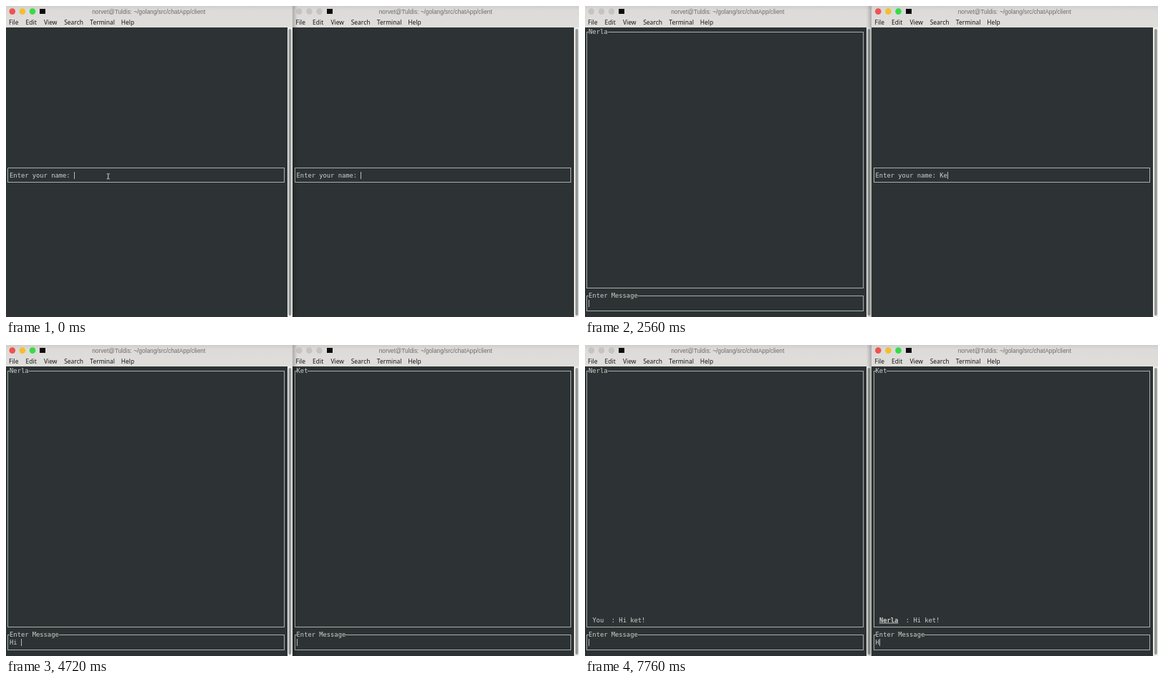
Recreate the animation shown at these times as an HTML page. Size 800 by 435 pixels, loop 8000 ms.

```html
<!DOCTYPE html>
<html lang="en">
<head>
<meta charset="utf-8">
<title>Terminal chat</title>
<style>
html, body { margin: 0; width: 100%; height: 100%; overflow: hidden; background: #2d3334; }
svg { display: block; width: 100vw; height: 100vh; }
text { white-space: pre; }
.mono { font: 8.77px "DejaVu Sans Mono", monospace; fill: #cdd1cb; }
.menu { font: 8.45px "Noto Sans", sans-serif; fill: #161616; }
.title { font: 8.32px "Liberation Sans", sans-serif; fill: #6d6c6a; text-anchor: middle; }
.line { fill: none; stroke: #a9b0ae; stroke-width: 1; }
.line, .crisp { shape-rendering: crispEdges; }
.sender { font-weight: bold; text-decoration: underline; }
</style>
</head>
<body>
<svg id="stage" viewBox="0 0 800 435" preserveAspectRatio="none">
  <defs>
    <linearGradient id="bar" x2="0" y2="1">
      <stop offset="0" stop-color="#cfcecd"/>
      <stop offset=".2" stop-color="#dcdbd9"/>
      <stop offset="1" stop-color="#dfdedb"/>
    </linearGradient>
    <linearGradient id="fade">
      <stop offset="0" stop-color="#000" stop-opacity=".22"/>
      <stop offset="1" stop-color="#000" stop-opacity="0"/>
    </linearGradient>
  </defs>
</svg>
<script>
const LOOP = 8000, STEP = 80, CELL = 5.28, BLINK = 600;
const LIGHTS = ['#f0524f', '#f3be2f', '#35dc47'], DIM = '#c5c4c1';
const MENU = [['File', 4], ['Edit', 27.6], ['View', 53], ['Search', 81.2], ['Terminal', 117.3], ['Help', 160.8]];
const PROMPT = 'Enter your name: ', LABEL = 'Enter Message';
const EDGE = { left: 2.6, right: 388.2, text: 5.1 };
const stage = document.getElementById('stage');

function add(parent, tag, attrs = {}, text) {
  const node = document.createElementNS('http://www.w3.org/2000/svg', tag);
  for (const key in attrs) node.setAttribute(key, attrs[key]);
  if (text !== undefined) node.textContent = text;
  parent.append(node);
  return node;
}
const group = (parent, dx = 0) => add(parent, 'g', { transform: `translate(${dx} 0)` });
const rect = (parent, x, y, width, height, fill, rx = 0) =>
  add(parent, 'rect', { x, y, width, height, fill, rx, class: rx ? '' : 'crisp' });
const mono = (parent, x, y, text = '') => add(parent, 'text', { x, y, class: 'mono' }, text);
const show = (node, on) => node.setAttribute('visibility', on ? 'visible' : 'hidden');

function box(parent, top, bottom, title = '') {
  const gap = title ? EDGE.text + title.length * CELL : EDGE.left;
  const end = title ? EDGE.text : EDGE.left;
  add(parent, 'path', {
    class: 'line',
    d: `M${gap} ${top}H${EDGE.right}V${bottom}H${EDGE.left}V${top}H${end}`
  });
  mono(parent, EDGE.text, top + 2.8, title);
}

function makePane(dx, name, sender) {
  const pane = group(stage, dx);
  rect(pane, -.5, 0, 401, 30, 'url(#bar)');
  const lights = LIGHTS.map((c, i) => add(pane, 'circle', { cx: 8.8 + 14.1 * i, cy: 7.6, r: 4.3 }));
  rect(pane, 47, 4, 8, 7, '#0b0b0b');
  add(pane, 'text', { x: 199.2, y: 10.6, class: 'title' }, 'norvet@Tuldis: ~/golang/src/chatApp/client');
  for (const [label, x] of MENU) add(pane, 'text', { x, y: 26.3, class: 'menu' }, label);

  rect(pane, -.4, 30, 394, 405, '#2d3334');
  rect(pane, 392.9, 30, 7.4, 405, '#eeedeb');
  rect(pane, 394.5, 32, 3.8, 401, '#949895', 1.9);

  const login = group(pane), chat = group(pane), message = group(chat);
  box(login, 226.5, 246.5);
  box(chat, 36.5, 394.5, name);
  box(chat, 405.5, 426.5, LABEL);
  const from = mono(message, 10.4, 387.6, sender);
  if (sender !== 'You') from.classList.add('sender');
  mono(message, 10.4 + (sender.length + 2) * CELL, 387.6, ': Hi ket!');
  const input = mono(pane, EDGE.text, 0);
  const caret = rect(pane, 0, 0, 1, 10, '#b4bab7');
  return { lights, login, chat, message, input, caret };
}

const left = makePane(0, 'Nerla', 'You');
const right = makePane(400.5, 'Ket', 'Nerla');
const shadeRight = rect(stage, 400, 0, 7, 435, 'url(#fade)');
const shadeLeft = rect(stage, 0, 0, 7, 435, 'url(#fade)');
shadeLeft.setAttribute('transform', 'translate(400 0) scale(-1 1)');
const pointer = add(stage, 'path', {
  d: 'M-2 -3.5H-.6L0 -3L.6 -3.5H2M0 -3V3M-2 3.5H-.6L0 3L.6 3.5H2',
  fill: 'none', stroke: '#e4e6e3', 'stroke-width': .9
});

// Typed text as [time, value, blink phase start if it differs]
left.names = [[0, ''], [80, 'N'], [240, 'Ne'], [400, 'Ner'], [560, 'Nerl'], [720, 'Nerla']];
left.joined = 960;
left.words = [[960, ''], [3440, '', 3240], [4240, 'H'], [4400, 'Hi'], [4720, 'Hi '], [5280, 'Hi k'],
  [5440, 'Hi ke'], [5600, 'Hi ket', 5240], [6400, 'Hi ket!'], [6480, '']];
left.sent = 6480;
right.names = [[0, ''], [1920, ''], [2320, 'K'], [2480, 'Ke'], [2640, 'Ket']];
right.joined = 2880;
right.words = [[2880, ''], [7520, ''], [7760, 'H']];
right.sent = 6560;

// Pointer trips: visible from, hidden at, move start, move end, start point, end point, sag
const trips = [
  [0, 80, 0, 80, 142.7, 238.3, 142.7, 238.3, 0],
  [1360, 2320, 1280, 1840, 142.7, 238.3, 511.2, 237.7, 12],
  [3200, 4240, 3120, 3440, 511.2, 237.7, 167.5, 416.5, 0],
  [7200, 7760, 7200, 7440, 167.5, 416.5, 438, 425, 8]
];

function drawPane(pane, t, focused) {
  const inChat = t >= pane.joined;
  const [at, text, phase = at] = (inChat ? pane.words : pane.names).findLast(e => e[0] <= t);
  const line = (inChat ? '' : PROMPT) + text;
  pane.lights.forEach((dot, i) => dot.setAttribute('fill', focused ? LIGHTS[i] : DIM));
  show(pane.login, !inChat);
  show(pane.chat, inChat);
  show(pane.message, t >= pane.sent);
  pane.input.textContent = line;
  pane.input.setAttribute('y', inChat ? 419.2 : 240);
  pane.caret.setAttribute('x', EDGE.text + line.length * CELL);
  pane.caret.setAttribute('y', inChat ? 411 : 232);
  show(pane.caret, !focused || Math.floor((t - phase) / BLINK) % 2 === 0);
}

function drawPointer(t) {
  const trip = trips.find(p => t >= p[0] && t < p[1]);
  show(pointer, !!trip);
  if (!trip) return;
  const [, , start, end, x0, y0, x1, y1, sag] = trip;
  const p = Math.min(1, (t - start) / (end - start));
  const k = p * p * (3 - 2 * p);
  const x = x0 + (x1 - x0) * k;
  const y = y0 + (y1 - y0) * k + sag * Math.sin(Math.PI * k);
  pointer.setAttribute('transform', `translate(${x} ${y})`);
}

function draw(now) {
  const t = Math.floor((now % LOOP) / STEP) * STEP;
  const leftFocus = t < 1920 || (t >= 3440 && t < 7520);
  drawPane(left, t, leftFocus);
  drawPane(right, t, !leftFocus);
  show(shadeRight, leftFocus);
  show(shadeLeft, !leftFocus);
  drawPointer(t);
}

const begin = performance.now();
function tick() {
  draw(performance.now() - begin);
  requestAnimationFrame(tick);
}
tick();
</script>
</body>
</html>
```
